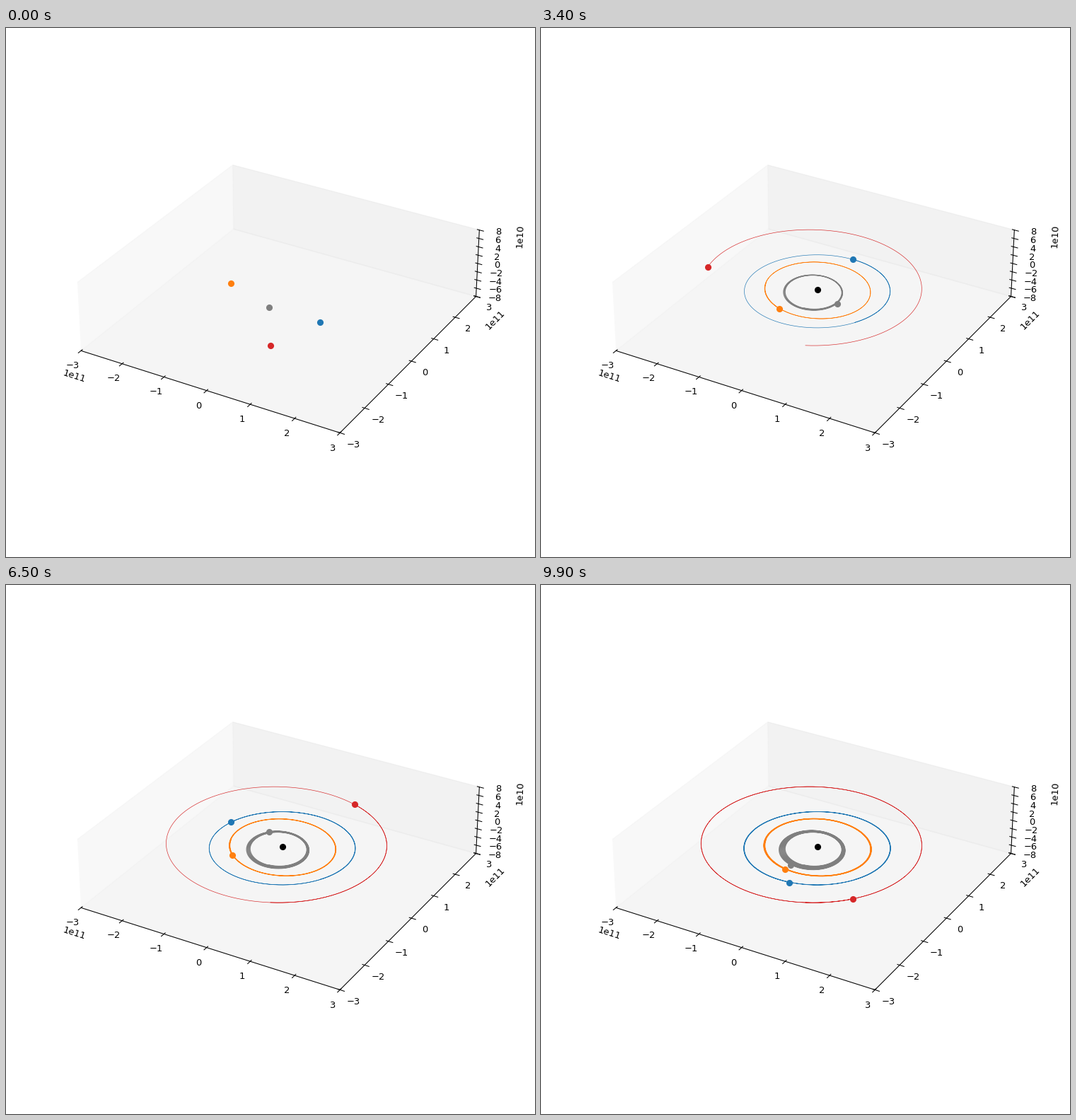
Animation of 748x748 px, one loop 10000 ms. Source, as a matplotlib script:

```python
import numpy as np
import matplotlib.pyplot as plt
from matplotlib.animation import FuncAnimation

FRAMES = 100
GM = 1.3271244e20          # m^3 / s^2
DT = 1239.5                # s per Euler step
STEPS = 1000               # steps per frame
STRIDE = 20                # steps between stored trail points
PER_FRAME = STEPS // STRIDE

# colour, semi-major axis (m), eccentricity, then in degrees:
# longitude of perihelion, mean anomaly, inclination, ascending node
PLANETS = [
    ("tab:gray", 5.799e10, 0.2056, 77.46, 207.4, 7.00, 48.3),
    ("tab:orange", 1.08209e11, 0.0068, 131.6, 67.9, 3.39, 76.7),
    ("tab:blue", 1.49598e11, 0.0167, 102.95, 228.1, 0.0, 0.0),
    ("tab:red", 2.27939e11, 0.0934, 336.06, 324.3, 1.85, 49.6),
]


def start_state(a, e, peri, mean):
    """Position and velocity in the orbital plane as complex numbers."""
    ecc = mean.copy()
    for _ in range(30):
        ecc = mean + e * np.sin(ecc)
    b = np.sqrt(1 - e**2)
    turn = np.exp(1j * peri)
    pos = a * (np.cos(ecc) - e + 1j * b * np.sin(ecc)) * turn
    speed = np.sqrt(GM / a) / (1 - e * np.cos(ecc))
    vel = speed * (-np.sin(ecc) + 1j * b * np.cos(ecc)) * turn
    return pos, vel


def integrate(pos, vel):
    """Explicit Euler; its energy drift slowly widens the inner orbits."""
    path = [pos]
    for step in range(1, (FRAMES - 1) * STEPS + 1):
        acc = -GM * pos / np.abs(pos)**3
        pos, vel = pos + vel * DT, vel + acc * DT
        if step % STRIDE == 0:
            path.append(pos)
    return np.array(path)


def tilt(path, inc, node):
    """Lift a planar path to x, y, z."""
    turn = np.exp(1j * node)
    flat = path / turn
    xy = (flat.real + 1j * flat.imag * np.cos(inc)) * turn
    return np.array([xy.real, xy.imag, flat.imag * np.sin(inc)])


colors = [p[0] for p in PLANETS]
a, e, *angles = np.array([p[1:] for p in PLANETS]).T
peri, mean, inc, node = np.radians(angles)
paths = integrate(*start_state(a, e, peri, mean))
orbits = [tilt(paths[:, i], inc[i], node[i]) for i in range(len(PLANETS))]

fig = plt.figure(figsize=(8, 8), dpi=93.5)
ax = fig.add_subplot(projection="3d")
ax.grid(False)
ax.set(xlim=(-3e11, 3e11), ylim=(-3e11, 3e11), zlim=(-8e10, 8e10))
ax.set_xticks(np.arange(-3, 4) * 1e11)
ax.set_yticks(np.arange(-3, 4) * 1e11)
ax.set_zticks(np.arange(-8, 9, 2) * 1e10)
ax.set_aspect("equal")

trails = [ax.plot([], [], [], color=c, lw=0.5)[0] for c in colors]
dots = [ax.plot([], [], [], "o", color=c)[0] for c in colors]
sun, = ax.plot([0], [0], [0], "o", color="black")


def update(frame):
    last = frame * PER_FRAME
    for orbit, trail, dot in zip(orbits, trails, dots):
        trail.set_data_3d(*orbit[:, :last + 1])
        dot.set_data_3d(*orbit[:, last:last + 1])
    sun.set_visible(frame > 0)
    return [*trails, *dots, sun]


anim = FuncAnimation(fig, update, frames=FRAMES, interval=100,
                     init_func=lambda: update(0), repeat=True, repeat_delay=0)
plt.show()
```
